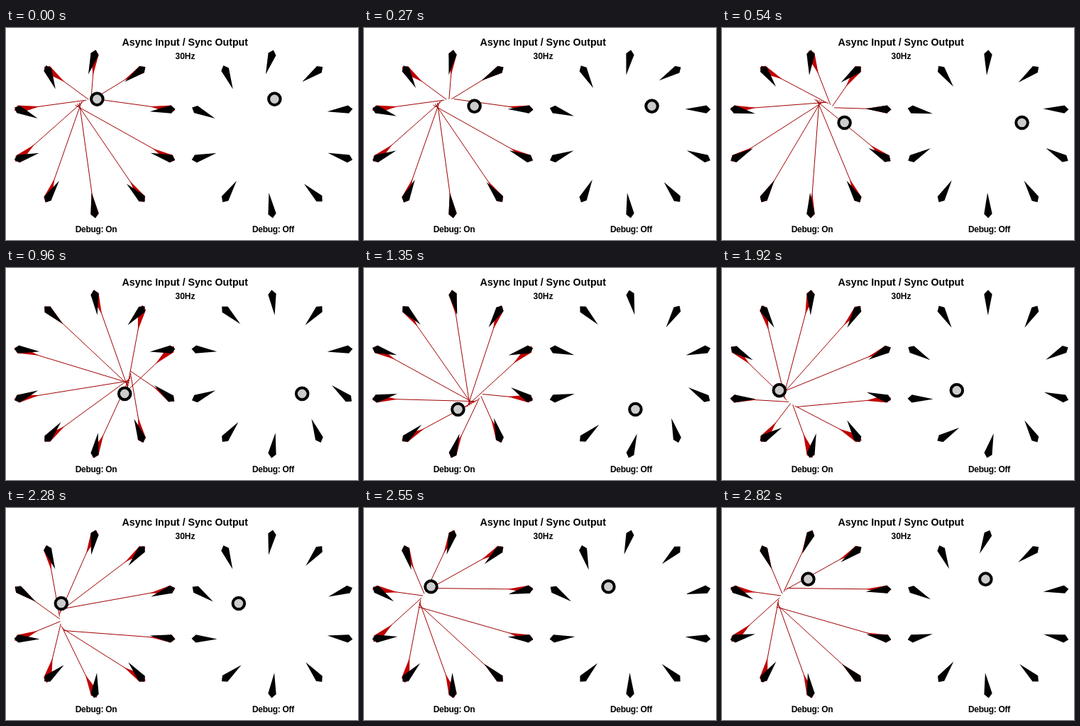
Write an HTML page with a canvas that moves like this. It is 496 px wide and 300 px high and loops after 2.85 s.

```html
<!DOCTYPE html>
<html lang="en">
<head>
<meta charset="utf-8">
<title>Async Input / Sync Output</title>
<style>
  html, body { margin: 0; width: 100%; height: 100%; overflow: hidden; background: #fff; }
  canvas, svg { position: absolute; left: 0; top: 0; width: 496px; height: 300px; }
  text { font: bold 12px "Liberation Sans", Arial, sans-serif; letter-spacing: -0.3px; text-anchor: middle; }
  .title { font-size: 14.2px; letter-spacing: 0; }
  .rate { letter-spacing: 0; }
</style>
</head>
<body>
<canvas id="stage" width="496" height="300"></canvas>
<svg viewBox="0 0 496 300">
  <text class="title" x="252.3" y="25">Async Input / Sync Output</text>
  <text class="rate" x="252.5" y="44">30Hz</text>
  <text x="127" y="289">Debug: On</text>
  <text x="376.5" y="289">Debug: Off</text>
</svg>
<script>
const ctx = document.getElementById('stage').getContext('2d');
const RAD = Math.PI / 180;
const STEP_MS = 30, STEPS = 95, COUNT = 10;
const CYCLE = STEPS / 9;        // steps between synchronised outputs
const TURN = 0.76;              // needle speed, degrees per step
const RING = 113, ORBIT = 50;
const RED = '#c00000', LINE = '#a00000';

// Starting deviation of each needle from the centre, clockwise from the top
const START = [17.5, 17.7, 12, -2, -9.7, -8.7, -3, 2.6, 7.5, 14.1];

// Point at an angle measured clockwise from the top
const polar = (r, deg) => ({ x: r * Math.sin(deg * RAD), y: -r * Math.cos(deg * RAD) });
const inward = i => 90 + 36 * i;
const wrap = deg => ((deg + 180) % 360 + 360) % 360 - 180;

const pivots = START.map((_, i) => polar(RING, 36 * i));

function ball(step) {
  const p = polar(ORBIT, 3.4 + 3.745 * step);
  return { x: p.x + 0.4, y: p.y + 0.5 };
}

// Inputs are sampled one needle after another, then released together
function sample(i, step) {
  const latest = Math.floor(step / CYCLE) * CYCLE - 0.5;
  const age = (COUNT + 2 - i) % COUNT;
  return ball(latest - age * CYCLE / COUNT);
}

function aim(i, step) {
  const p = pivots[i], s = sample(i, step);
  return wrap(Math.atan2(s.y - p.y, s.x - p.x) / RAD - inward(i));
}

// Needles turn towards their sample at a limited speed
const poses = [START];
for (let n = 1; n < STEPS; n++) {
  poses.push(poses[n - 1].map((a, i) => {
    const gap = aim(i, n) - a;
    return a + Math.max(-TURN, Math.min(TURN, gap));
  }));
}

function needle(i, offset, color) {
  const p = pivots[i];
  ctx.save();
  ctx.translate(p.x, p.y);
  ctx.rotate((inward(i) + offset) * RAD);
  ctx.beginPath();
  ctx.moveTo(-6, 0);
  ctx.lineTo(0, -5.7);
  ctx.lineTo(30, 0);
  ctx.lineTo(0, 5.7);
  ctx.closePath();
  ctx.fillStyle = color;
  ctx.fill();
  ctx.restore();
}

function drawDebug(step) {
  ctx.strokeStyle = LINE;
  ctx.lineWidth = 1;
  pivots.forEach((p, i) => {
    const s = sample(i, step);
    ctx.beginPath();
    ctx.moveTo(p.x, p.y);
    ctx.lineTo(s.x, s.y);
    ctx.stroke();
    needle(i, aim(i, step), RED);
  });
}

function drawPanel(cx, step, debug) {
  ctx.save();
  ctx.translate(cx, 150);
  if (debug) drawDebug(step);
  poses[step].forEach((a, i) => needle(i, a, '#000'));
  const b = ball(step);
  ctx.beginPath();
  ctx.arc(b.x, b.y, 8.3, 0, 2 * Math.PI);
  ctx.fillStyle = '#ccc';
  ctx.fill();
  ctx.strokeStyle = '#000';
  ctx.lineWidth = 4;
  ctx.stroke();
  ctx.restore();
}

const begin = performance.now();
function draw() {
  const step = Math.floor((performance.now() - begin) / STEP_MS) % STEPS;
  ctx.fillStyle = '#fff';
  ctx.fillRect(0, 0, 496, 300);
  drawPanel(125, step, true);
  drawPanel(375, step, false);
  requestAnimationFrame(draw);
}
draw();
</script>
</body>
</html>
```
